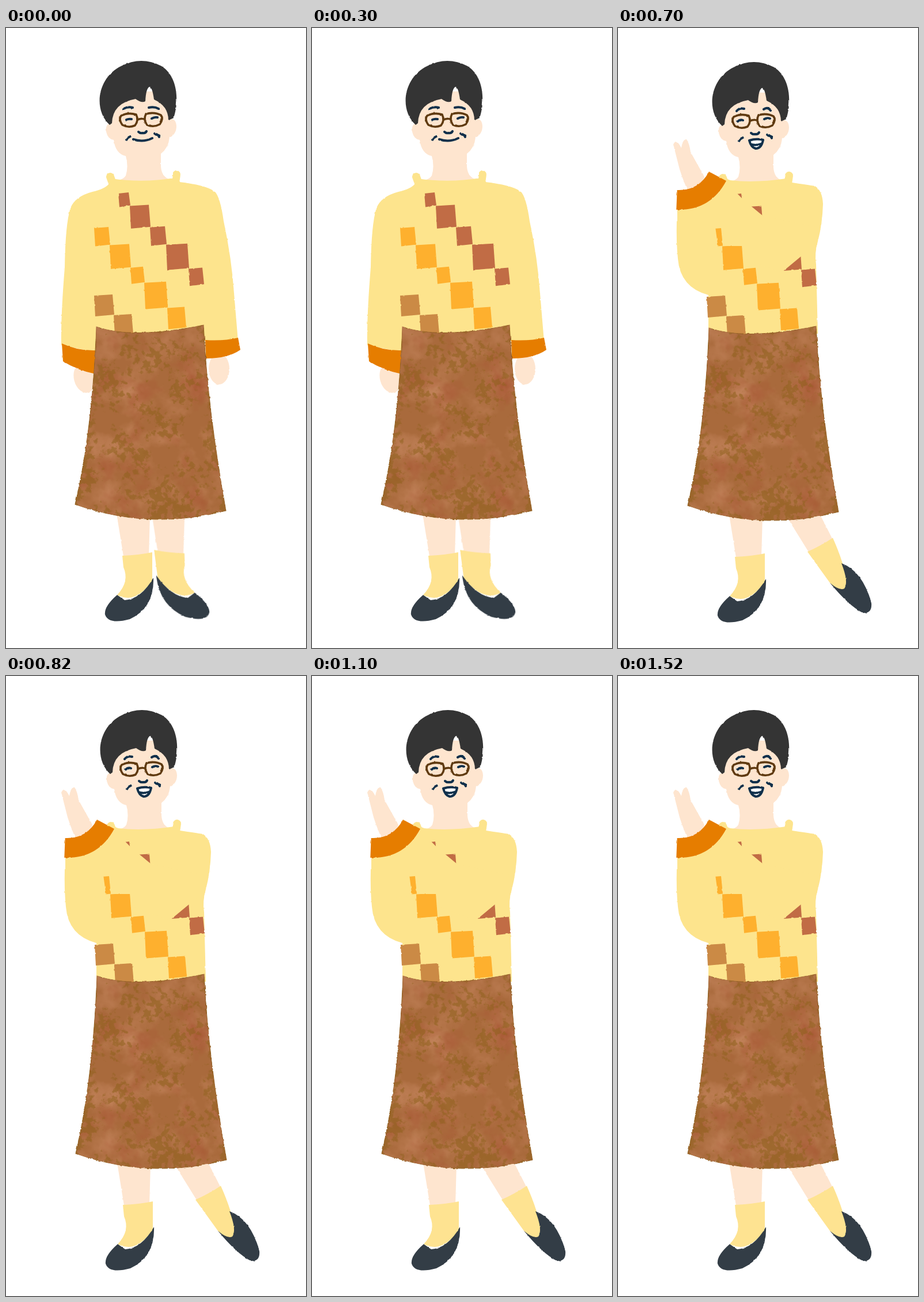
These frames come from a looping animation (521x1075 px, 1800 ms). An HTML page:

```html
<!DOCTYPE html>
<html lang="en">
<head>
<meta charset="utf-8">
<title>Waving figure</title>
<style>
  html, body { margin: 0; width: 100%; height: 100%; overflow: hidden; background: #fff; }
  svg { display: block; width: 100%; height: 100%; }
  .hair { fill: #343434; } .skin { fill: #fee5cf; } .knit { fill: #fde48d; }
  .sock { fill: #fee391; } .shoe { fill: #333d46; } .cuff { fill: #e67d00; }
  .brick { fill: #c16c45; } .gold { fill: #feb02e; } .tan { fill: #cb8a45; }
  .band { fill: none; stroke: #e67d00; }
  .collar { stroke: #fde48d; stroke-width: 14; stroke-linecap: round; }
  .line { fill: none; stroke: #10304b; stroke-width: 4; stroke-linecap: round; stroke-linejoin: round; }
  .frame { fill: none; stroke: #5f3a10; stroke-width: 3.6; stroke-linejoin: round; }
  .skirt { fill: #a96a3c; stroke: #8e5c20; stroke-width: 1.2; }
</style>
</head>
<body>
<svg viewBox="0 0 521 1075" color-interpolation-filters="sRGB">
  <defs>
    <filter id="rough" filterUnits="userSpaceOnUse" x="0" y="0" width="521" height="1075">
      <feTurbulence type="fractalNoise" baseFrequency=".14" numOctaves="2" seed="4"/>
      <feDisplacementMap in="SourceGraphic" scale="2.2" xChannelSelector="R" yChannelSelector="G"/>
    </filter>
    <!-- Suede: soft clouds, then fine olive grain that clusters and thickens near the edge -->
    <filter id="suede" filterUnits="userSpaceOnUse" x="100" y="500" width="300" height="370">
      <feTurbulence type="fractalNoise" baseFrequency=".02" numOctaves="4" seed="8" result="clouds"/>
      <feColorMatrix in="clouds" values="0 0 0 0 .75  0 0 0 0 .5  0 0 0 0 .34  0 0 2.4 0 -1" result="light"/>
      <feColorMatrix in="clouds" values="0 0 0 0 .66  0 0 0 0 .35  0 0 0 0 .21  0 2.4 0 0 -1.25" result="red"/>
      <feColorMatrix in="clouds" values="0 0 0 0 0  0 0 0 0 0  0 0 0 0 0  1 0 0 0 0" result="density"/>
      <feTurbulence type="fractalNoise" baseFrequency=".1" numOctaves="4" seed="21"/>
      <feColorMatrix values="0 0 0 0 0  0 0 0 0 0  0 0 0 0 0  1 0 0 0 0" result="grain"/>
      <feComposite in="grain" in2="density" operator="arithmetic" k1="2" result="clusters"/>
      <feGaussianBlur in="SourceAlpha" stdDeviation="16" result="soft"/>
      <feComposite in="clusters" in2="soft" operator="arithmetic" k2="1" k3="-.2" k4=".2"/>
      <feColorMatrix values="0 0 0 0 .56  0 0 0 0 .38  0 0 0 0 .11  0 0 0 6 -3.2" result="olive"/>
      <feComponentTransfer in="olive" result="speckle"><feFuncA type="linear" slope=".55"/></feComponentTransfer>
      <feMerge result="cloth">
        <feMergeNode in="SourceGraphic"/><feMergeNode in="light"/>
        <feMergeNode in="red"/><feMergeNode in="speckle"/>
      </feMerge>
      <feComposite in="cloth" in2="SourceAlpha" operator="in" result="skirt"/>
      <feTurbulence type="fractalNoise" baseFrequency=".16" numOctaves="2" seed="4" result="wobble"/>
      <feDisplacementMap in="skirt" in2="wobble" scale="3" xChannelSelector="R" yChannelSelector="G"/>
    </filter>
    <g id="leg">
      <path class="skin" d="M192 842L204 916H248L250 845Z"/>
      <path class="sock" d="M202 915Q230 914 254 909V958Q225 1000 193 983Q215 960 204 935Z"/>
      <path class="shoe" d="M193 983Q170 1003 172 1017Q178 1035 215 1025Q258 1005 256 953Q235 990 206 992Z"/>
    </g>
    <g id="kick">
      <path class="skin" d="M283 845L326 914L368 893L342 842Z"/>
      <path class="sock" d="M323 912Q346 902 367 888Q388 935 392 968Q385 990 362 966Z"/>
      <path class="shoe" d="M362 966Q395 1006 419 1018Q436 1020 434 1000Q418 945 382 932Q395 965 387 976Q378 980 362 966Z"/>
    </g>
    <path id="lens" class="frame" d="M200 152Q212 146 226 150Q231 160 224 169Q213 174 202 168Q195 158 200 152Z"/>
    <path id="collar" class="collar" d="M181 258L186 272M296 254L294 268"/>
    <path id="jumper" class="knit" d="M184 256Q188 262 195 264Q238 269 292 261L302 268Q330 272 342 274Q355 282 356 305Q355 340 347 370Q341 390 344 410L347 530H157V463Q108 450 104 400Q101 370 102 335H145L170 276Z"/>
  </defs>

  <g class="body" filter="url(#rough)">
    <path class="skin" d="M184 165Q172 165 174 180Q177 193 187 194Q190 218 208 222Q213 240 208 256Q204 262 195 264V274H285V263Q270 258 269 240V218Q282 208 284 190Q296 184 296 170Q295 156 284 158V110H185Z"/>
    <path class="hair" d="M180 168C150 140 160 85 200 66Q235 48 270 66C300 85 300 130 291 156L282 160Q282 135 257 124Q254 102 249 102Q243 105 242 127Q236 131 225 123Q185 130 184 165Z"/>
    <use href="#lens"/><use href="#lens" transform="translate(469 -1) scale(-1 1)"/>
    <path class="frame" d="M228 159Q235 156 241 158"/>
    <path class="line" d="M230 180Q233 183 237 182Q242 183 244 179M209 194Q211 190 216 188M258 183Q264 184 266 189"/>
  </g>

  <g data-pose="stand" filter="url(#rough)">
    <ellipse class="skin" cx="136" cy="607" rx="18" ry="26" transform="rotate(-15 136 607)"/>
    <ellipse class="skin" cx="370" cy="591" rx="18" ry="27"/>
    <use href="#collar"/>
    <path class="knit" d="M183 261Q238 269 292 260L301 267Q345 272 362 283Q372 292 378 335Q392 400 396 460L403 543H340V530H158L156 562L96 550Q95 500 102 415Q103 340 112 312Q120 292 150 284Q172 279 179 270Z"/>
    <path class="cuff" d="M97 547Q125 560 156 559V600Q125 594 99 578Z"/>
    <path class="cuff" d="M346 541Q378 543 403 537L407 558Q385 573 347 573Z"/>
    <g class="pattern"></g>
    <use href="#leg" transform="matrix(-1 0 .13 1 393 -4)"/>
    <path class="line" d="M204 140Q212 136 220 138M248 138Q258 136 265 140M209 159Q213 157 218 158M253 157Q258 154 263 155M221 193Q238 199 254 191"/>
  </g>

  <g data-pose="clap" filter="url(#rough)">
    <path class="skin" d="M102 319L72 264Q68 254 78 254L104 267L89 239Q92 227 102 241L110 252L158 286L139 301L124 290L128 307L110 322Z"/>
    <use href="#collar" x="1" y="2"/><use href="#jumper"/>
    <g class="pattern" transform="translate(1 2)"></g>
    <path class="knit" d="M185 286L217 314V305H229V320L253 335L345 345V375L319 395L284 424L218 403L194 382L173 369L182 383L174 382L145 385V330Z"/>
    <path class="band" stroke-width="28" d="M102 333Q145 335 175 284"/>
    <use href="#kick"/>
    <path class="line" style="fill:#f6e7df" d="M230 198Q238 195 251 198Q249 206 241 206Q234 205 230 198Z"/>
  </g>

  <g data-pose="wave" filter="url(#rough)">
    <path class="skin" d="M122 283Q115 270 107 245L96 202Q101 190 110 208Q112 193 119 193Q124 200 126 215L150 258L145 275Z"/>
    <use href="#collar" x="1" y="2"/><use href="#jumper"/>
    <g class="pattern" transform="translate(1 2)"></g>
    <path class="knit" d="M190 270L218 298L252 326L345 345V375L319 395L284 424L219 400V378H184L180 345H169L174 382L145 385L103 345V300H150Z"/>
    <path class="band" stroke-width="34" d="M102 298Q150 300 173 257"/>
    <use href="#kick" x="6" y="-4"/>
    <path class="line" style="fill:#fff" d="M228 195Q240 191 252 194Q249 209 239 209Q231 207 228 195ZM232 202Q240 204 248 201"/>
  </g>

  <g data-pose="clap wave" filter="url(#rough)">
    <path class="line" d="M206 144Q211 138 219 140M253 141Q260 136 265 143M208 162Q212 158 217 160M254 158Q259 155 264 157"/>
  </g>

  <g class="body">
    <use href="#leg" filter="url(#rough)"/>
    <path class="skirt" filter="url(#suede)" d="M157 518Q220 540 343 515Q350 660 382 837Q250 872 120 826Q150 700 157 518Z"/>
  </g>
</svg>
<script>
// Patches step down corner to corner, each slightly askew.
function chain(color, x, y, ratio, widths) {
  return widths.map(w => {
    const h = w * ratio;
    const d = `M${x} ${y}l${w - 2} -2l3 ${h + 1}l${1 - w} 3Z`;
    x += w;
    y += h;
    return `<path class="${color}" d="${d}"/>`;
  }).join('');
}
const pattern = chain('brick', 195, 287, 1.07, [20, 35, 28, 39, 26])
  + chain('gold', 153, 347, 1.09, [27, 36, 24, 40, 32])
  + chain('tan', 153, 464, 1, [34, 33]);
document.querySelectorAll('.pattern').forEach(g => { g.innerHTML = pattern; });

// Hard cuts between poses: [start ms, pose]
const LOOP = 1800;
const schedule = [[0, 'stand'], [500, 'clap'], [700, 'wave'], [900, 'clap'], [1100, 'wave'], [LOOP, 'wave']];
function play(selector, prop, valueFor) {
  document.querySelectorAll(selector).forEach(el => {
    const frames = schedule.map(([t, pose]) =>
      ({ offset: t / LOOP, [prop]: valueFor(pose, el), easing: 'steps(1, end)' }));
    el.animate(frames, { duration: LOOP, iterations: Infinity });
  });
}
play('[data-pose]', 'opacity', (pose, el) => el.dataset.pose.split(' ').includes(pose) ? 1 : 0);
play('.body', 'transform', pose => pose === 'stand' ? 'translate(0px, 0px)' : 'translate(1px, 2px)');
</script>
</body>
</html>
```
